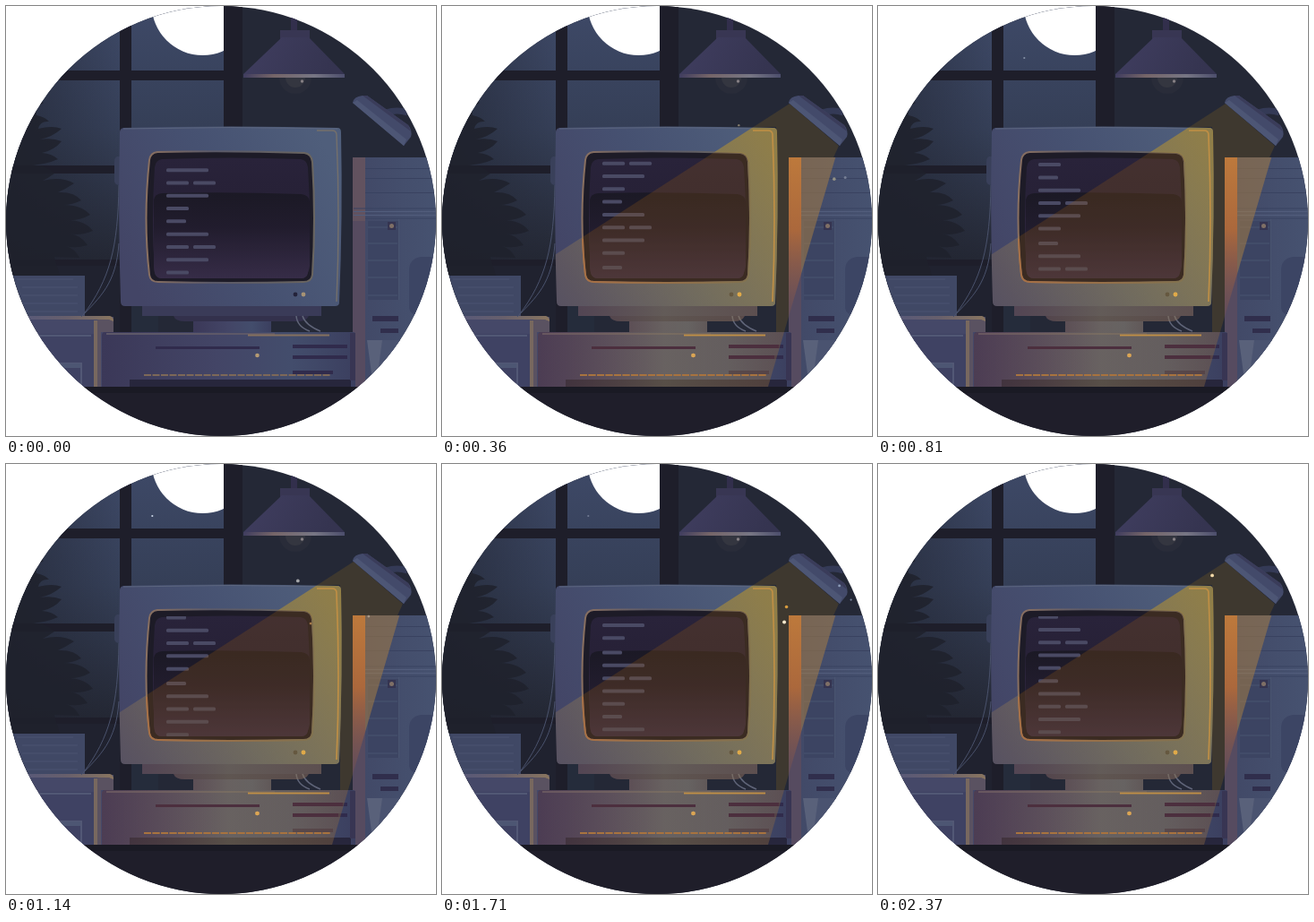
Write an HTML page that moves like this. It is 480 by 480 pixels and loops after 2400 ms.

```html
<!DOCTYPE html>
<html lang="en">
<head>
<meta charset="utf-8">
<title>Night desk</title>
<style>
html, body { margin: 0; width: 100%; height: 100%; overflow: hidden; background: #fff; }
svg { display: block; width: 100vw; height: 100vh; }
</style>
</head>
<body>
<svg viewBox="0 0 480 480">
<defs>
  <clipPath id="round"><circle cx="240" cy="240" r="240" shape-rendering="crispEdges"/></clipPath>
  <clipPath id="pane"><path d="M0 0H243V300H0Z"/></clipPath>
  <clipPath id="beam"><path d="M388 109L93 299V425H364L443 156Z"/></clipPath>
  <clipPath id="glass"><path d="M169 170H333Q340 238 337 304H167Q163 238 169 170Z"/></clipPath>
  <linearGradient id="sky" x2="0" y2="1"><stop stop-color="#3e4967"/><stop offset=".45" stop-color="#353f57"/><stop offset="1" stop-color="#222530"/></linearGradient>
  <linearGradient id="shade"><stop stop-color="#1f222e" stop-opacity=".6"/><stop offset="1" stop-color="#1f222e" stop-opacity="0"/></linearGradient>
  <linearGradient id="case" y1=".7" y2=".3"><stop stop-color="#434566"/><stop offset=".5" stop-color="#465171"/><stop offset="1" stop-color="#4f5e7b"/></linearGradient>
  <linearGradient id="base"><stop stop-color="#3b3858"/><stop offset=".45" stop-color="#434566"/><stop offset=".75" stop-color="#434d6c"/><stop offset="1" stop-color="#3b3f5f"/></linearGradient>
  <linearGradient id="tower"><stop stop-color="#414866"/><stop offset="1" stop-color="#465270"/></linearGradient>
  <linearGradient id="shadeLamp" x2="1" y2=".2"><stop stop-color="#403e60"/><stop offset="1" stop-color="#353450"/></linearGradient>
  <linearGradient id="rim"><stop stop-color="#403d5f"/><stop offset=".3" stop-color="#756568"/><stop offset=".7" stop-color="#777684"/><stop offset="1" stop-color="#4c4e6c"/></linearGradient>
  <linearGradient id="tube" x2="0" y2="1"><stop stop-color="#29233a"/><stop offset=".27" stop-color="#272137"/><stop offset="1" stop-color="#352b46"/></linearGradient>
  <linearGradient id="reflect" x2="0" y2="1"><stop stop-color="#1b1925"/><stop offset=".4" stop-color="#211c2d"/><stop offset="1" stop-color="#362c47"/></linearGradient>
  <linearGradient id="trim"><stop stop-color="#8a7060"/><stop offset=".4" stop-color="#5a5968"/><stop offset="1" stop-color="#6a655f"/></linearGradient>
  <linearGradient id="litTrim"><stop stop-color="#a97045"/><stop offset=".6" stop-color="#92704a"/><stop offset="1" stop-color="#80714f"/></linearGradient>
  <linearGradient id="boxTop"><stop stop-color="#56587a"/><stop offset=".5" stop-color="#675f6c"/><stop offset="1" stop-color="#89755f"/></linearGradient>
  <linearGradient id="warm" gradientUnits="userSpaceOnUse" x1="130" y1="340" x2="375" y2="170"><stop stop-color="#a78450" stop-opacity=".2"/><stop offset=".45" stop-color="#a58c48" stop-opacity=".45"/><stop offset="1" stop-color="#a78a37" stop-opacity=".72"/></linearGradient>
  <linearGradient id="warmBase" gradientUnits="userSpaceOnUse" x1="107" y1="0" x2="390" y2="0"><stop stop-color="#915040" stop-opacity=".2"/><stop offset=".5" stop-color="#9b8858" stop-opacity=".42"/><stop offset="1" stop-color="#94683a" stop-opacity=".36"/></linearGradient>
  <linearGradient id="copper" x2="0" y2="1"><stop stop-color="#bd793c"/><stop offset=".4" stop-color="#ab683c"/><stop offset="1" stop-color="#785050" stop-opacity=".1"/></linearGradient>
</defs>
<g clip-path="url(#round)">
  <!-- wall and window -->
  <path fill="#242836" d="M0 0H480V480H0Z"/>
  <path fill="url(#sky)" d="M0 0H243V300H0Z"/>
  <path fill="url(#shade)" d="M0 0H127V300H0Z"/>
  <circle cx="219.500" cy="-2" r="57" fill="#fff" clip-path="url(#pane)"/>
  <path fill="#252c3b" d="M140 294H170V364H140Z"/>
  <path fill="#1e1e2a" d="M127 0H140V364H127ZM0 72H127V83H0ZM140 72H243V83H140ZM0 178H127V187H0ZM0 283H127V293H0ZM243 0H264V135H243Z"/>
  <path fill="#20222f" d="M0 290H127V364H0Z"/>
  <path fill="#1f212c" d="M0 102Q34 102 42 108Q32 113 34 122Q44 124 48 129Q38 128 36 137Q52 133 62 137Q52 146 38 149Q52 147 62 151Q54 161 40 164Q52 165 58 171Q42 178 28 177Q45 178 54 187Q47 192 41 195Q62 190 76 198Q67 204 58 208Q76 207 84 217Q74 222 64 222Q84 222 94 233Q82 240 68 239Q88 239 97 251Q82 257 71 254Q84 256 91 267Q77 271 67 268Q77 271 82 281L54 280L60 301H0Z" opacity=".85"/>
  <circle id="star" cx="163.300" cy="58" r="1.100" fill="#c8d3e5"/>

  <!-- hanging lamp -->
  <circle cx="323" cy="80" r="18" fill="#292c39"/>
  <circle cx="323" cy="80" r="11" fill="#343640"/>
  <circle cx="330.500" cy="84" r="1.700" fill="#868084"/>
  <path fill="#322f4c" d="M318 0H325V27H318Z"/>
  <path fill="#383653" d="M306 27H339V37H306Z"/>
  <path fill="url(#shadeLamp)" d="M308 35H338L378 76H265Z"/>
  <path fill="url(#rim)" d="M265 76H378V80H265Z"/>

  <!-- tower -->
  <path fill="url(#tower)" d="M387 169H480V425H387Z"/>
  <path fill="#62525f" d="M387 169H401V425H387Z"/>
  <path fill="#4b4563" d="M387 240H401V425H387Z" opacity=".5"/>
  <path fill="none" stroke="#394260" d="M401 181.500H480M401 192.500H480M401 208.500H480M388 226H480M401 237H480"/>
  <path fill="none" stroke="#525d7c" d="M388 229.500H480M388 233.500H480"/>
  <path fill="#3c4462" d="M404 240H438V328H404Z"/>
  <path fill="none" stroke="#495470" d="M404 247H437M404 265H437M404 284H437M404 303H437M404 323H437M438.500 238V328"/>
  <path fill="#3c4564" d="M480 280H463Q450 282 450 295V337Q451 345 461 345H480Z"/>
  <path fill="#302e4c" d="M409 346H438V352H409ZM418 360H438V365H418Z"/>
  <path fill="#59617a" d="M403 373H442L435 425H410Z"/>
  <path fill="#4a5370" d="M420 373H442L435 425H413Z"/>
  <path fill="#353450" d="M426 241H435V250H426Z"/>
  <circle cx="430.500" cy="245.500" r="2.500" fill="#7f6f66"/>

  <!-- paper and box -->
  <path fill="#404865" d="M8 301H88V347H8Z"/>
  <path fill="none" stroke="#4a5370" d="M12 305H75M18 314H80M18 323H80M18 332H80M18 341H80"/>
  <path fill="#454868" d="M0 347H120V425H0Z"/>
  <path fill="#3f4263" d="M0 366H98V425H0Z"/>
  <path fill="#78685f" d="M98 351H106V425H98Z"/>
  <path fill="#5a5261" d="M106 347H117Q120 347 120 350V364H106V425H102V351Z"/>
  <path fill="url(#boxTop)" d="M14 348Q14 346 20 346H116Q120 347 120 352L115 350H14Z"/>
  <path fill="none" stroke="#525875" stroke-width="2" d="M0 368H95M61 425V399H84V425"/>
  <path fill="#4d5673" d="M62 399H83V404H62Z"/>
  <path fill="none" stroke="#4a526c" d="M126 200C125 270 116 305 86 345M126 265C123 310 105 325 84 347"/>

  <!-- computer -->
  <path fill="#39405a" d="M127 168H124Q121 169 121 174V196Q122 200 127 200Z"/>
  <path fill="#3a3b58" d="M152 335H352V346H152Z"/>
  <path fill="#33314c" d="M187 346H338Q335 352 326 352H200Q189 352 187 346Z"/>
  <path fill="url(#base)" d="M209 352H296V365H209Z"/>
  <path fill="none" stroke="#5f6478" stroke-width="1.500" d="M324 346Q325 358 339 363M331 346Q334 356 351 363"/>
  <path fill="url(#base)" d="M110 364H388Q390 364 390 367V425H107V368Q107 364 110 364Z"/>
  <path fill="none" stroke="#5d5868" stroke-width="2" d="M112 366H300"/>
  <path fill="none" stroke="#85715f" stroke-width="2" d="M270 367.500H361"/>
  <path fill="#302b4c" d="M167 380H283V383H167ZM320 378H381V382H320ZM320 390H381V394H320ZM320 407H365V411H320Z"/>
  <path fill="#27263c" d="M138 417H385V425H138Z"/>
  <path fill="#383553" d="M384 365H390V418H384Z"/>
  <path fill="none" stroke="#7d6858" stroke-width="2" stroke-dasharray="8 1.500" d="M154 412H363"/>
  <circle cx="280.500" cy="390" r="2.300" fill="#b59b73"/>
  <path fill="url(#case)" d="M131 136Q250 133 370 136Q374 136 374 141Q376 235 372 331Q372 335 367 335H133Q128 335 128 330Q125 235 127 141Q127 137 131 136Z"/>
  <path fill="none" stroke="#5c667f" d="M131 137Q250 134 370 137"/>
  <path fill="none" stroke="#75706b" stroke-width="1.400" d="M347 139H364Q369 139 369 144Q373 238 369 330"/>
  <path fill="#1d1b27" stroke="url(#trim)" stroke-width="2" d="M169 163Q250 161 333 164Q341 165 342 174Q346 238 342 300Q341 308 332 308Q250 310 170 308Q161 308 160 300Q153 238 160 172Q161 164 169 163Z"/>
  <path fill="url(#tube)" d="M174 171Q250 168 329 171Q336 172 337 180Q341 238 337 298Q336 304 329 304H174Q167 304 166 297Q162 238 166 180Q167 172 174 171Z"/>
  <path fill="url(#reflect)" d="M165 216Q166 210 174 209Q250 207 330 210Q338 211 339 218V290Q337 304 329 304H174Q165 304 165 290Z"/>
  <g clip-path="url(#glass)"><g id="code" fill="#4a4a64"/></g>
  <circle cx="323" cy="322" r="2.400" fill="#24233a"/>
  <circle cx="332" cy="322" r="2.400" fill="#a79375"/>

  <!-- lamp light -->
  <g id="light">
    <g clip-path="url(#beam)">
      <path fill="#a57a18" opacity=".2" d="M334 135L388 108L443 156L437 169H387V364H373V135Z"/>
      <path fill="url(#warm)" fill-rule="evenodd" d="M131 136Q250 133 370 136Q374 136 374 141Q376 235 372 331Q372 335 367 335H133Q128 335 128 330Q125 235 127 141ZM169 163Q161 164 160 172Q153 238 160 300Q161 308 170 308Q250 310 332 308Q341 308 342 300Q346 238 342 174Q341 165 333 164Q250 161 169 163Z"/>
      <path fill="#8a5518" opacity=".28" d="M169 163Q250 161 333 164Q341 165 342 174Q346 238 342 300Q341 308 332 308H170Q161 308 160 300Q153 238 160 172Z"/>
      <path fill="url(#warmBase)" d="M152 335H352V346H338Q335 352 326 352H296V364H390V417H385V425H107V366L110 364H209V352H200Q189 352 187 346H152Z"/>
      <path fill="#a57c45" opacity=".55" d="M401 169H445L401 325Z"/>
      <path fill="url(#copper)" d="M387 169H401V370H387Z"/>
    </g>
    <path fill="none" stroke="#c08f45" stroke-width="1.600" d="M347 139H364Q369 139 369 144Q373 238 369 330M270 367.500H361"/>
    <path fill="none" stroke="url(#litTrim)" stroke-width="1.800" d="M157 260Q158 285 160 300Q161 308 170 308Q250 310 332 308Q341 308 342 300Q346 238 342 174"/>
    <path fill="none" stroke="#a8733f" stroke-width="2" stroke-dasharray="8 1.500" d="M154 412H363"/>
    <path fill="#4c2f3e" d="M167 380H283V383H167ZM320 378H376V382H320ZM320 390H371V394H320Z"/>
    <circle cx="280.500" cy="390" r="2.300" fill="#dba553"/>
    <circle cx="332" cy="322" r="2.400" fill="#e0aa49"/>
  </g>

  <!-- desk lamp and table -->
  <path fill="none" stroke="#343a56" stroke-width="7" d="M424 119Q437 115 448 119"/>
  <path fill="#434a6a" d="M387 108Q388 101 398 100L403 100L449 133Q454 139 452 146L444 156Z"/>
  <path fill="#4d5675" d="M387 108L392 105L447 149L444 156Z"/>
  <path fill="#3a3c5a" d="M398 100H403L449 133L452 140Z"/>
  <path fill="#1f1e2a" d="M0 425H480V480H0Z"/>
  <path fill="#1a1a24" d="M0 425H480V432H0Z"/>
  <g id="dust"></g>
</g>
</svg>
<script>
const LOOP = 2400, SCROLL = 145, LINE = 14.3;
const byId = id => document.getElementById(id);
const code = byId('code'), light = byId('light'), star = byId('star'), dust = byId('dust');

function add(parent, tag, attrs) {
  const el = document.createElementNS('http://www.w3.org/2000/svg', tag);
  for (const key in attrs) el.setAttribute(key, attrs[key]);
  return parent.appendChild(el);
}

// Each line is a list of [x, width] dashes; the pattern repeats every five lines.
const lines = [[[179, 47]], [[179, 25], [209, 25]], [[179, 47]], [[179, 25]], [[179, 22]]];
for (let i = 0; i < 22; i++) {
  const y = 180 + Math.floor(i / 10) * SCROLL + (i % 10) * LINE + (i % 10 === 9 ? 2 : 0);
  for (const [x, width] of lines[i % 5]) add(code, 'rect', { x, y, width, height: 4, rx: 1.5 });
}

// Lamp brightness and star brightness as [time, level].
const lampKeys = [[0, 0], [90, 0], [150, 1], [420, 1], [495, 0.4], [540, 1], [1230, 1], [1290, 0], [1380, 0], [1440, 1], [2400, 1]];
const starKeys = [[0, 0], [600, 0], [1000, 1], [1400, 1], [1900, 0], [2400, 0]];

function level(keys, t) {
  const i = keys.findIndex(k => k[0] > t);
  const [a, from] = keys[i - 1], [b, to] = keys[i];
  return from + (to - from) * (t - a) / (b - a);
}

// Motes: time of peak, place there, speed in px/ms, size, colour.
const motes = [
  [240, 416, 198, .18, -.04, 1.8, '#aaa58c'],
  [400, 336, 132, .12, -.03, 1.2, '#837b6c'],
  [510, 465, 187, .1, -.03, 1.5, '#a0a8b8'],
  [1240, 339, 129, .133, -.014, 1.9, '#a5a7ab'],
  [1240, 418, 176, .133, .06, 1.4, '#aa9a87'],
  [1140, 340, 178, .05, .05, 1.4, '#a47848'],
  [1710, 384.5, 159.5, .05, -.04, 1.8, '#d79b3e'],
  [1710, 382, 176.5, .04, .03, 2, '#f5e8cd'],
  [1710, 443.5, 136, .08, -.03, 1.4, '#8c9bb8'],
  [1710, 456.5, 151.5, .06, .03, 1.1, '#7c88a3'],
  [2370, 373, 124.5, .06, -.04, 1.9, '#f2d9a8']
].map(([peak, x, y, vx, vy, r, fill]) => ({ peak, x, y, vx, vy, el: add(dust, 'circle', { r, fill }) }));

function draw(now) {
  const t = now % LOOP;
  code.setAttribute('transform', `translate(0 ${1.2 - SCROLL * t / LOOP})`);
  light.setAttribute('opacity', level(lampKeys, t));
  star.setAttribute('opacity', level(starKeys, t));
  for (const { peak, x, y, vx, vy, el } of motes) {
    const d = t - peak;
    el.setAttribute('cx', x + vx * d);
    el.setAttribute('cy', y + vy * d);
    el.setAttribute('opacity', Math.max(0, Math.min(1, 1.8 - Math.abs(d) / 120)));
  }
  requestAnimationFrame(draw);
}
draw(performance.now());
</script>
</body>
</html>
```
